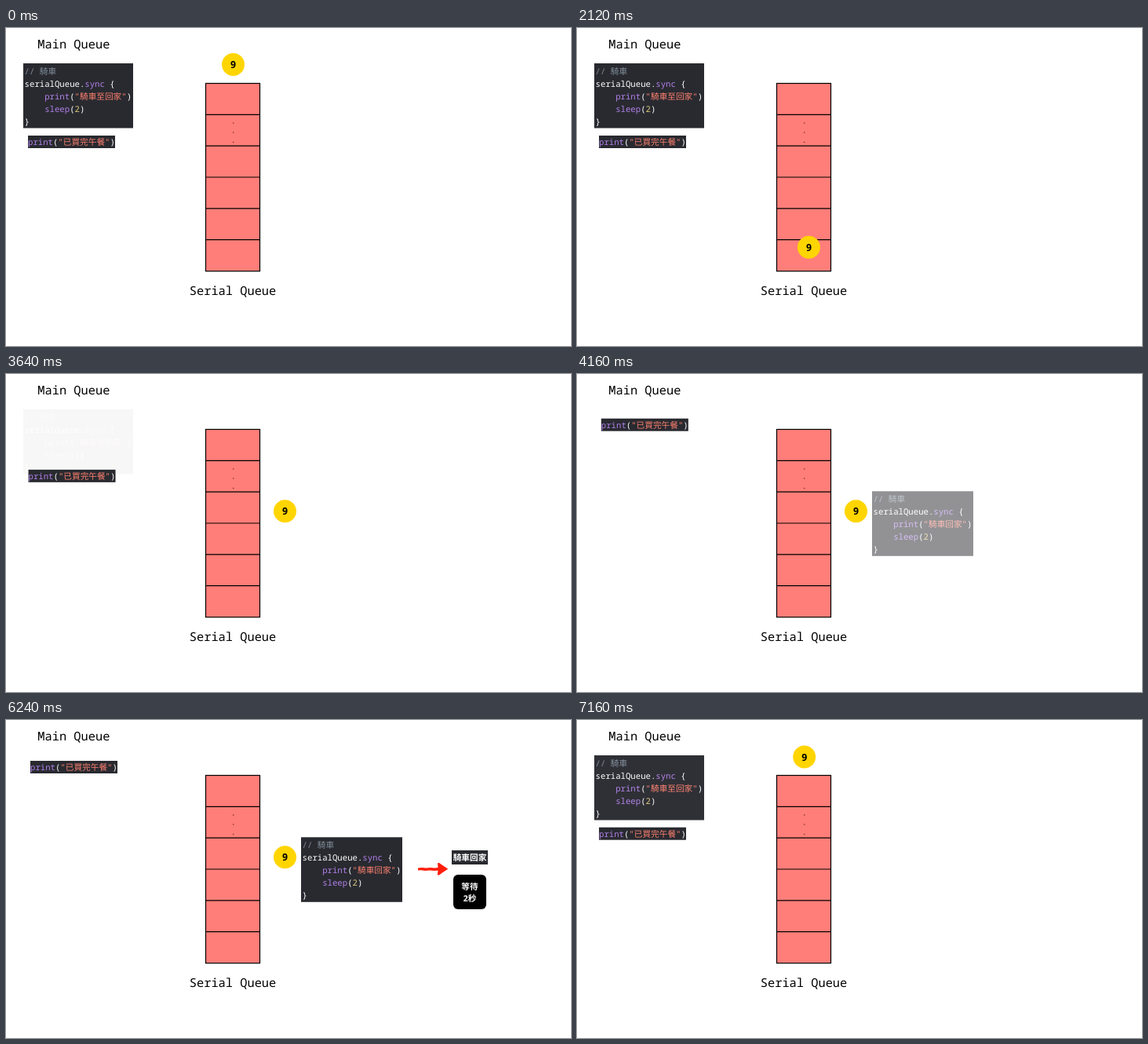
Animation, 720 px wide and 405 px high, one loop 7.2 s. Source, as an HTML page:

```html
<!DOCTYPE html>
<html lang="zh-Hant">
<head>
<meta charset="utf-8">
<title>Serial queue, sync</title>
<style>
  html, body { margin: 0; width: 100%; height: 100%; overflow: hidden; background: #fff; }
  svg { display: block; width: 720px; height: 405px; }
  text { font: 500 10.67px "Noto Sans Mono", "Noto Sans CJK TC", "Noto Sans CJK", monospace;
         white-space: pre; text-rendering: geometricPrecision; }
  .title { font-size: 15.35px; }
  .code { fill: #fff; }
  .panel { fill: #292a30; }
  .note { fill: #7f8c98; }
  .call { fill: #b281eb; }
  .str { fill: #ff8170; }
  .num { fill: #d9c97c; }
  .bold { font-weight: 700; fill: #fff; text-anchor: middle; }
  #ball text { font-size: 12.5px; font-weight: 800; text-anchor: middle; }
</style>
</head>
<body>
<svg viewBox="0 0 720 405">
  <text class="title" x="40.3" y="25.7">Main Queue</text>
  <text class="title" x="233.8" y="339.7">Serial Queue</text>
  <g id="queue" fill="#ff7e79" stroke="#000" stroke-width="1.2"></g>
  <g id="before"></g>
  <g id="after"></g>
  <g id="lunch">
    <rect class="panel" x="28" y="137" width="111" height="16"/>
    <text class="code" x="28" y="149.3"><tspan class="call">print</tspan>(<tspan class="str">"已買完午餐"</tspan>)</text>
  </g>
  <clipPath id="wipe"><rect x="523" y="178" width="0" height="24"/></clipPath>
  <g id="arrow" clip-path="url(#wipe)" fill="#ff1d0a">
    <path d="M525 188.6L530 188L535 188.5L541 187.9L546 188.4L550.5 188L550 182.2L552 182L557 185.6L563.3 189.7L557 193.8L552 197.6L549.8 197.5L550.5 191.7L545 192L540 191.4L534 192L529 191.3L525 191.5Z"/>
  </g>
  <g id="label">
    <rect class="panel" x="-23" y="-9" width="46" height="18"/>
    <text class="bold" y="4">騎車回家</text>
  </g>
  <g id="badge">
    <rect x="570" y="197" width="42" height="44" rx="6"/>
    <text class="bold" x="591" y="215.5">等待</text>
    <text class="bold" x="591" y="230.5">2秒</text>
  </g>
  <g id="ball">
    <circle r="14.5" fill="#ffd500"/>
    <text y="4.6">9</text>
  </g>
</svg>
<script>
const LOOP = 7200, MOVE = 960;
const el = id => document.getElementById(id);
const clamp = v => Math.min(1, Math.max(0, v));
const span = (t, start, length) => clamp((t - start) / length);
const mix = (a, b, p) => a + (b - a) * p;

// Equivalent of cubic-bezier(.42, 0, .58, 1)
function ease(x) {
  let lo = 0, hi = 1;
  for (let i = 0; i < 24; i++) {
    const s = (lo + hi) / 2;
    const at = 1.26 * s * (1 - s) ** 2 + 1.74 * s * s * (1 - s) + s ** 3;
    if (at < x) lo = s; else hi = s;
  }
  return lo * lo * (3 - 2 * lo);
}

function backOut(x) {
  const k = 2;
  return 1 + (k + 1) * (x - 1) ** 3 + k * (x - 1) ** 2;
}

function codeBlock(x, y, width, message) {
  const lines = [
    [0, '<tspan class="note">// 騎車</tspan>'],
    [0, 'serialQueue.<tspan class="call">sync</tspan> {'],
    [25.6, `<tspan class="call">print</tspan>(<tspan class="str">"${message}"</tspan>)`],
    [25.6, '<tspan class="call">sleep</tspan>(<tspan class="num">2</tspan>)'],
    [0, '}']
  ];
  return `<rect class="panel" x="${x}" y="${y}" width="${width}" height="82.5"/>` +
    lines.map(([indent, body], i) =>
      `<text class="code" x="${x + 1.6 + indent}" y="${y + 14.1 + i * 15.85}">${body}</text>`).join('');
}

function queueCells() {
  let out = '<rect x="254.5" y="70.5" width="69" height="239.2"/>';
  for (let i = 1; i < 6; i++) out += `<path d="M254 ${70.5 + i * 39.83}H324"/>`;
  for (const y of [121, 133, 145.5])
    out += `<circle cx="289.7" cy="${y}" r=".8" fill="#7d2b28" stroke="none"/>`;
  return out;
}

el('queue').innerHTML = queueCells();
el('before').innerHTML = codeBlock(22, 45, 140, '騎車至回家');
el('after').innerHTML = codeBlock(376, 149.3, 129, '騎車回家');

const stops = [[289.5, 46.5], [289.5, 289.5], [355.5, 174.8], [289.5, 46.5]];
const starts = [480, 1920, 6240];
const RUN = 3360, RESET = 6240;
const wipe = document.querySelector('#wipe rect');

// Outgoing items fade in the first third of a move, incoming ones in the last.
const fadeOut = (t, start) => 1 - ease(span(t, start, MOVE / 3));
const fadeIn = (t, start) => ease(span(t, start + MOVE * 2 / 3, MOVE / 3));
const place = (id, x, y, scale = 1) =>
  el(id).setAttribute('transform', `translate(${x} ${y}) scale(${scale})`);

function draw(t) {
  let [x, y] = stops[0];
  starts.forEach((start, i) => {
    const p = ease(span(t, start, MOVE));
    if (t >= start) [x, y] = [0, 1].map(k => mix(stops[i][k], stops[i + 1][k], p));
  });
  place('ball', x, y);

  const lift = ease(span(t, RUN, MOVE)) - ease(span(t, RESET, MOVE));
  place('lunch', 3 * lift, -85 * lift);

  const leaving = fadeOut(t, RESET);
  el('before').style.opacity = t < RESET ? fadeOut(t, RUN) : fadeIn(t, RESET);
  el('after').style.opacity = fadeIn(t, RUN) * leaving;

  wipe.setAttribute('width', 42 * ease(span(t, 4320, 480)));
  place('label', 591, 175, backOut(span(t, 4880, 400)));
  el('arrow').style.opacity = el('label').style.opacity = leaving;
  el('badge').style.opacity = ease(span(t, 5400, 360)) * leaving;
}

function tick() {
  draw(performance.now() % LOOP);
  requestAnimationFrame(tick);
}
tick();
</script>
</body>
</html>
```
